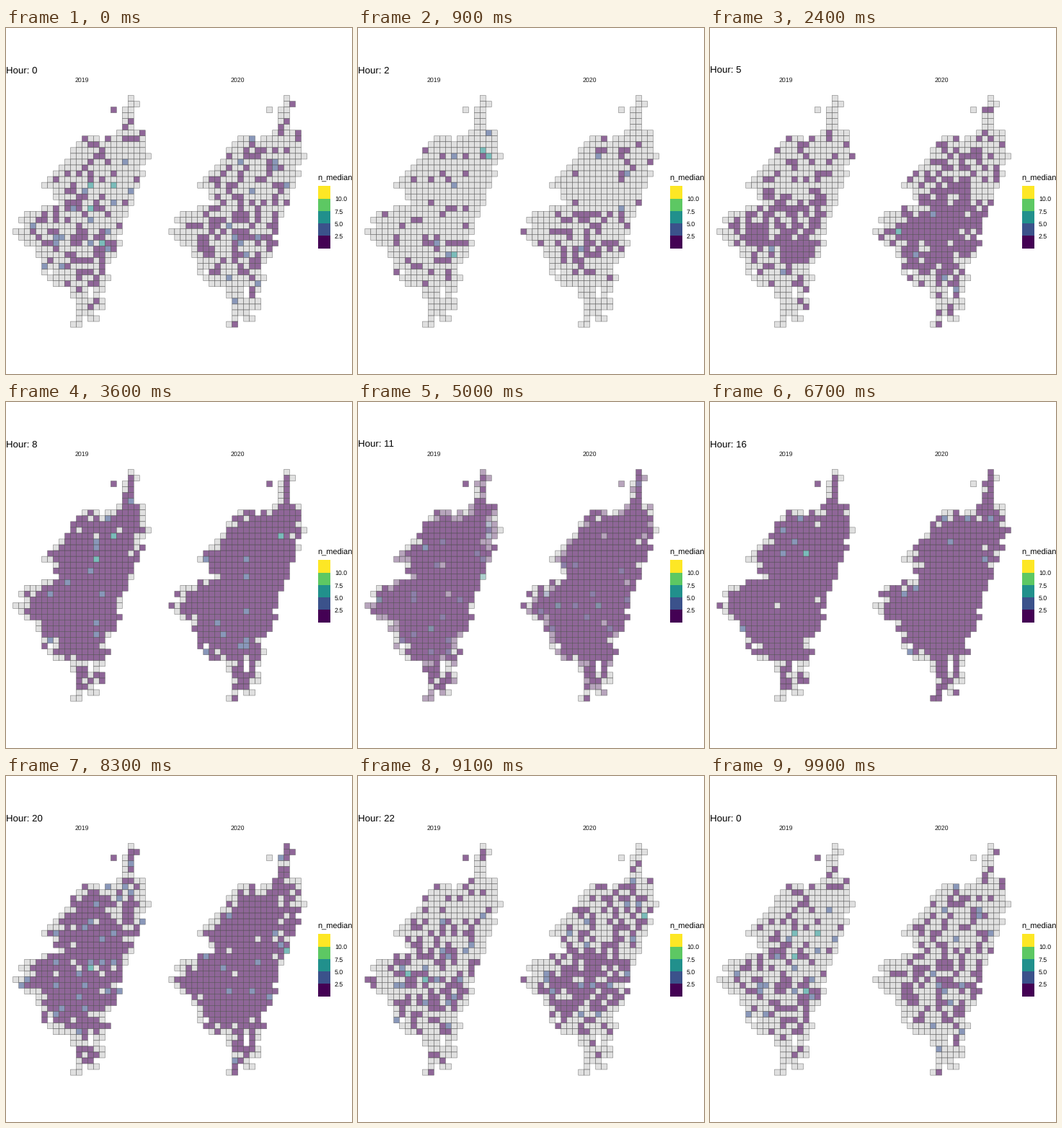
A matplotlib script for the animation above (10000 ms loop, 480 px wide and 480 px high).

```python
import numpy as np
import matplotlib.pyplot as plt
from matplotlib.animation import FuncAnimation
from matplotlib.collections import PolyCollection
from matplotlib.patches import Rectangle

plt.rcParams["font.family"] = "Liberation Sans"
plt.rcParams["text.hinting"] = "none"

SIZE = 480
CELL_W, CELL_H = 7.98, 8.04
LEFT, TOP = 9.7, 93.5
PANELS = {2019: 0.0, 2020: 216.2}
ROWS, COLS = 40, 24
FRAMES = 100

VIRIDIS = np.array([[68, 1, 84], [59, 82, 139], [33, 144, 140],
                    [93, 200, 99], [253, 231, 37]]) / 255
PALETTE = np.vstack([[0.8] * 3, VIRIDIS])   # index 0 is "no data"

# Coastline corners as (row, column); straight lines run between them.
WEST = [(0, 20), (1, 19.6), (6, 18.4), (7, 12), (10, 9.6), (15, 5), (16, 6.6),
        (18, 7.6), (20, 2), (21, 1), (22, 2), (23, 0), (25, 2), (26, 4),
        (30, 5.2), (32, 7), (33, 10), (36, 11.2), (38, 11), (39, 10)]
EAST = [(0, 20), (1, 21), (2, 20), (5, 20), (6, 22), (9, 22), (10, 23),
        (12, 21), (13, 22), (14, 21.2), (24, 17.2), (25, 18), (29, 15.2),
        (30, 15), (31, 16), (34, 14.4), (35, 15), (36, 15), (37, 13),
        (38, 14), (39, 11)]
BAYS = [(7, 15), (30, 6), (33, 13), (34, 13), (38, 12)]
ISLET = (2, 17)


def island():
    rows, cols = np.mgrid[:ROWS, :COLS]
    west, east = (np.round(np.interp(rows, *zip(*side)))
                  for side in (WEST, EAST))
    mask = (cols >= west) & (cols <= east)
    for bay in BAYS:
        mask[bay] = False
    mask[ISLET] = True
    return mask


def coast_depth(mask):
    """0 on the coast, 1 one cell inland, 2 further in."""
    depth, inner = np.zeros(mask.shape), mask
    for _ in range(2):
        p = np.pad(inner, 1)
        inner = (inner & p[:-2, 1:-1] & p[2:, 1:-1]
                 & p[1:-1, :-2] & p[1:-1, 2:])
        depth += inner
    # The busier east coast and the northern and southern spines.
    for area in (np.s_[11:28, 13:], np.s_[1:7, 20], np.s_[33:38, 11:13]):
        depth[area] = np.maximum(depth[area], 1)
    return depth


mask = island()
row, col = np.nonzero(mask)
depth = coast_depth(mask)[row, col]
centre = np.exp(-(((col - 11.5) / 8) ** 2 + ((row - 23) / 7.5) ** 2) ** 2)


def sigmoid(x):
    return 1 / (1 + np.exp(-x))


def bump(hour, peak, width):
    return np.exp(-((hour - peak) / width) ** 2)


def hourly_levels(year, hour):
    """Colour index of every cell: more data by day, inland and centrally."""
    later = year == 2020
    dawn, dusk = (5.8, 20.3) if later else (7, 20)
    day = sigmoid((hour - dawn) / 0.6) * sigmoid((dusk - hour) / 0.8)
    lull, rush = bump(hour, 3, 1.7), bump(hour, 5, 1)

    odds = (-1.9 + 1.3 * day - 1.6 * lull
            + (0.9 + day + 1.5 * rush + later) * centre
            + (0.3 + 2.2 * day) * depth)
    local = np.random.default_rng(year).logistic(size=len(row))
    rng = np.random.default_rng(year * 100 + hour)
    noise = 0.6 * local + 0.8 * rng.logistic(size=len(row))

    share = 0.02 + (0.05 if later else 0.13) * (1 - day) * (1 - rush)
    u = rng.random(len(row))
    value = 1 + (u < share) + (u < 0.12 * share)
    return np.where(odds + noise > 0, value, 0)


# Fill colours per hour, both panels in one array.
colours = [PALETTE[np.concatenate([hourly_levels(y, h) for y in PANELS])]
           for h in range(24)]


def arrival(hour):
    """Frame at which an hour is fully shown."""
    if hour == 0:
        return 0
    if hour <= 5:
        return 5 * hour - 1
    return 4 * hour + (4 if hour <= 11 else 3)


def state(frame):
    """Current hour, next hour and the share of the blend between them."""
    hour = max(h for h in range(25) if arrival(h) <= frame)
    if hour == 24:
        return 0, 0, 0.0
    steps = 3 if hour < 5 else 2
    blend = max(0.0, 1 - (arrival(hour + 1) - frame) / steps)
    return hour, (hour + 1) % 24, blend


def cell_corners(offset):
    x, y = LEFT + offset + col * CELL_W, TOP + row * CELL_H
    return np.stack([np.stack([x + dx * CELL_W, y + dy * CELL_H], axis=-1)
                     for dx, dy in ((0, 0), (1, 0), (1, 1), (0, 1))], axis=1)


fig = plt.figure(figsize=(SIZE / 72, SIZE / 72), dpi=72, facecolor="white")
ax = fig.add_axes([0, 0, 1, 1])
ax.set(xlim=(0, SIZE), ylim=(SIZE, 0))
ax.axis("off")

cells = PolyCollection(
    np.concatenate([cell_corners(dx) for dx in PANELS.values()]),
    edgecolors="#595959", linewidths=0.43)
cells.set_snap(False)
ax.add_collection(cells, autolim=False)

title = ax.text(0, 63, "", fontsize=13.2)
for year, dx in PANELS.items():
    ax.text(105 + dx, 75, str(year), fontsize=8.8, ha="center",
            color="#1a1a1a")

ax.text(432.5, 211.5, "n_median", fontsize=11)
BAR_TOP, BAR_STEP = 219.3, 17.28
for i, colour in enumerate(VIRIDIS[::-1]):
    ax.add_patch(Rectangle((433, BAR_TOP + i * BAR_STEP), 17.28, BAR_STEP,
                           facecolor=colour, linewidth=0))
for i, label in enumerate(("10.0", "7.5", "5.0", "2.5"), 1):
    ax.text(456, BAR_TOP + i * BAR_STEP + 3.6, label, fontsize=8.8)


def update(frame):
    hour, following, blend = state(frame)
    rgb = (1 - blend) * colours[hour] + blend * colours[following]
    cells.set_facecolor(np.column_stack([rgb, np.full(len(rgb), 0.6)]))
    title.set_text(f"Hour: {following if blend > 0.5 else hour}")
    return cells, title


anim = FuncAnimation(fig, update, frames=FRAMES, interval=100, repeat=True,
                     repeat_delay=0)
plt.show()
```
